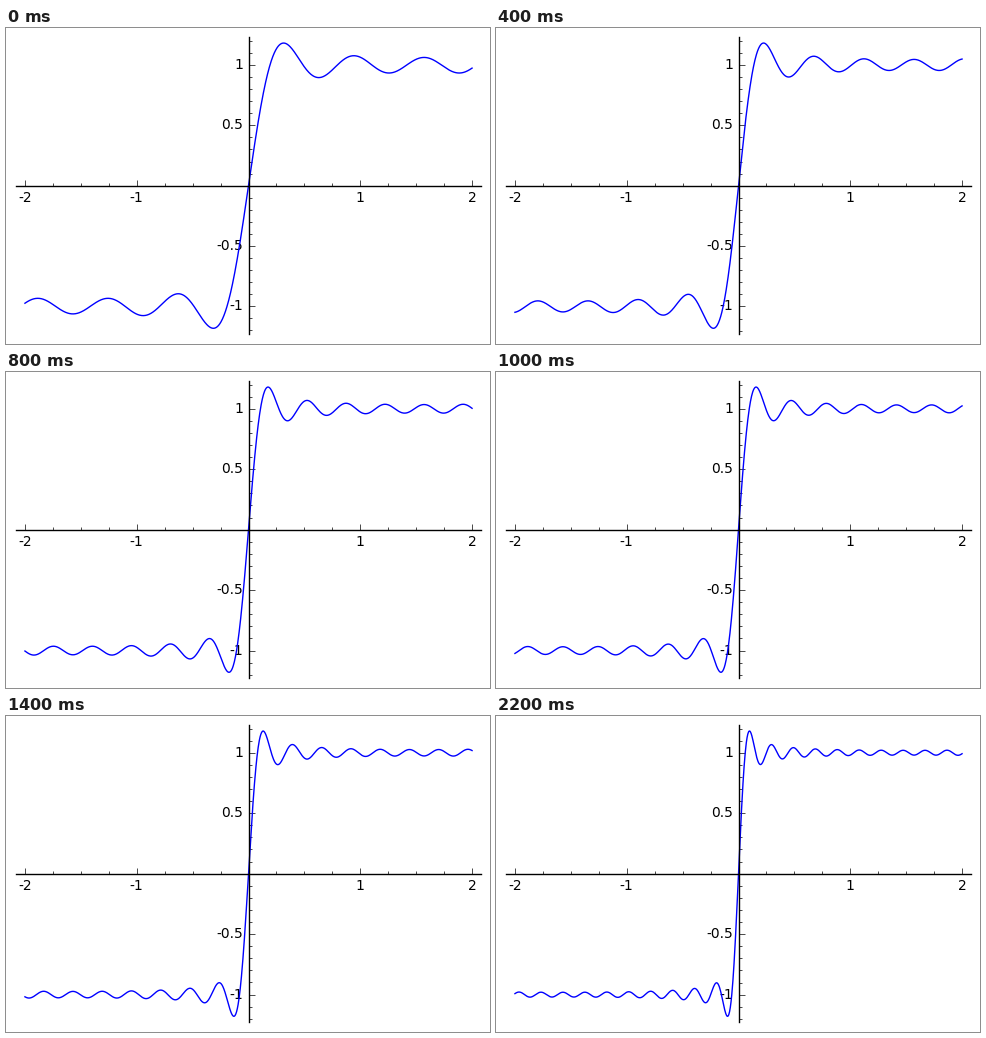
These frames come from a looping animation (484 px wide and 316 px high, 2.4 s). A matplotlib script:

```python
import numpy as np
import matplotlib.pyplot as plt
from matplotlib.animation import FuncAnimation
from matplotlib.ticker import FixedLocator, FuncFormatter, MultipleLocator

WIDTH, HEIGHT, DPI = 484, 316, 100
FRAMES, INTERVAL = 12, 200
FIRST_TERMS = 5
PAD = 0.02

plt.rcParams.update({
    "font.family": "DejaVu Sans",
    "font.size": 10,
    "ytick.alignment": "center",
    "savefig.dpi": "figure",
})


def square_wave(x, terms):
    """Partial Fourier sum of a square wave with period 2 pi."""
    odd = 2 * np.arange(terms) + 1
    return 4 / np.pi * (np.sin(np.outer(x, odd)) / odd).sum(axis=1)


def padded(low, high):
    margin = PAD * (high - low)
    return low - margin, high + margin


def style_axis(axis, ticks, minor_step):
    axis.set_major_locator(FixedLocator(ticks))
    axis.set_minor_locator(MultipleLocator(minor_step))
    axis.set_major_formatter(FuncFormatter(lambda v, _: f"{v:g}"))


fig = plt.figure(figsize=(WIDTH / DPI, HEIGHT / DPI), dpi=DPI, facecolor="white")
ax = fig.add_axes([10 / WIDTH, 10 / HEIGHT, 465 / WIDTH, 296.66 / HEIGHT])

for side in ("top", "right"):
    ax.spines[side].set_visible(False)
for side in ("left", "bottom"):
    ax.spines[side].set_position("zero")
    ax.spines[side].set_linewidth(1)

style_axis(ax.xaxis, [-2, -1, 1, 2], 0.25)
style_axis(ax.yaxis, [-1, -0.5, 0.5, 1], 0.1)
ax.tick_params(which="both", direction="in", width=0.5, pad=4, top=False, right=False)
ax.tick_params(which="major", length=4)
ax.tick_params(which="minor", length=2)

x = np.linspace(-2, 2, 1201)
ax.set_xlim(*padded(-2, 2))
curve, = ax.plot([], [], color="#0000ff", linewidth=1)


def update(frame):
    y = square_wave(x, FIRST_TERMS + frame)
    curve.set_data(x, y)
    ax.set_ylim(*padded(y.min(), y.max()))
    return curve,


anim = FuncAnimation(fig, update, frames=FRAMES, interval=INTERVAL,
                     repeat=True, repeat_delay=0, blit=False)
plt.show()
```
